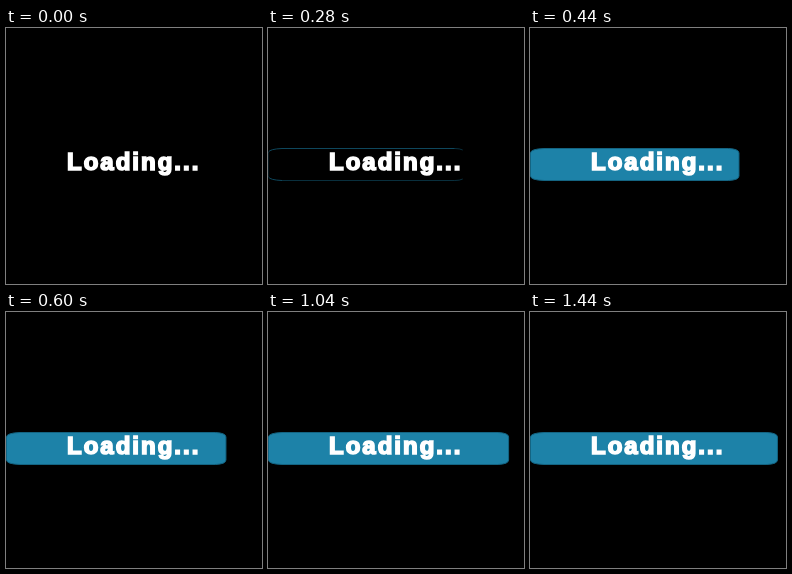
An HTML page that plays this animation: 256 by 256 pixels, repeating every 5.92 s.

```html
<!DOCTYPE html>
<html lang="en">
<head>
<meta charset="utf-8">
<title>Loading</title>
<style>
  html, body { margin: 0; height: 100%; overflow: hidden; background: #000; }
  svg { display: block; width: 100vw; height: 100vh; }
  text {
    font: bold 24px "Liberation Sans", Arial, sans-serif;
    letter-spacing: 2px;
    fill: #fff; stroke: #fff; stroke-width: 1.7px;
  }
  path { fill: none; stroke: #146482; }
</style>
</head>
<body>
<svg viewBox="0 0 256 256">
  <g id="outline">
    <path id="top"/>
    <path d="M14 120.5Q2 121 .5 124M.5 149Q2 152 14 152.5"/>
    <path d="M.5 124V149" opacity=".3"/>
    <path id="late"/>
  </g>
  <path id="bar" style="fill:#1d82a8"/>
  <text x="61" y="142.2">Loading...</text>
</svg>
<script>
const LOOP = 5920, STEP = 40, FILL_AT = 440, STOP = 1440;
const el = id => document.getElementById(id);
const [outline, topLine, late, bar] = ["outline", "top", "late", "bar"].map(el);

// The right edge decelerates towards x = 248.
const edge = t => 248 - 35.6 * ((1480 - t) / 1000) ** 2;

function draw(time) {
  const t = Math.min(STOP, Math.floor(time % LOOP / STEP) * STEP);
  const x = edge(t), filled = t >= FILL_AT;

  outline.style.display = t > 0 && !filled ? "" : "none";
  outline.style.opacity = Math.min(1, 0.25 + t / 600);
  topLine.setAttribute("d", `M14 120.5H${x - 10}`);

  // The bottom line and right corners appear after the top line.
  late.style.opacity = Math.min(1, Math.max(0, (t - 120) / 240));
  late.setAttribute("d", `M14 152.5H${x - 10}Q${x - 5} 152.5 ${x - 2} 151
    M${x - 10} 120.5Q${x - 5} 120.5 ${x - 2} 122`);

  bar.style.display = filled ? "" : "none";
  bar.setAttribute("d", `M14 120.5H${x - 11}Q${x - .5} 121 ${x - .5} 125V148
    Q${x - .5} 152 ${x - 11} 152.5H14Q.5 152 .5 148V125Q.5 121 14 120.5Z`);
}

const start = performance.now();
function tick() {
  draw(performance.now() - start);
  requestAnimationFrame(tick);
}
tick();
</script>
</body>
</html>
```
